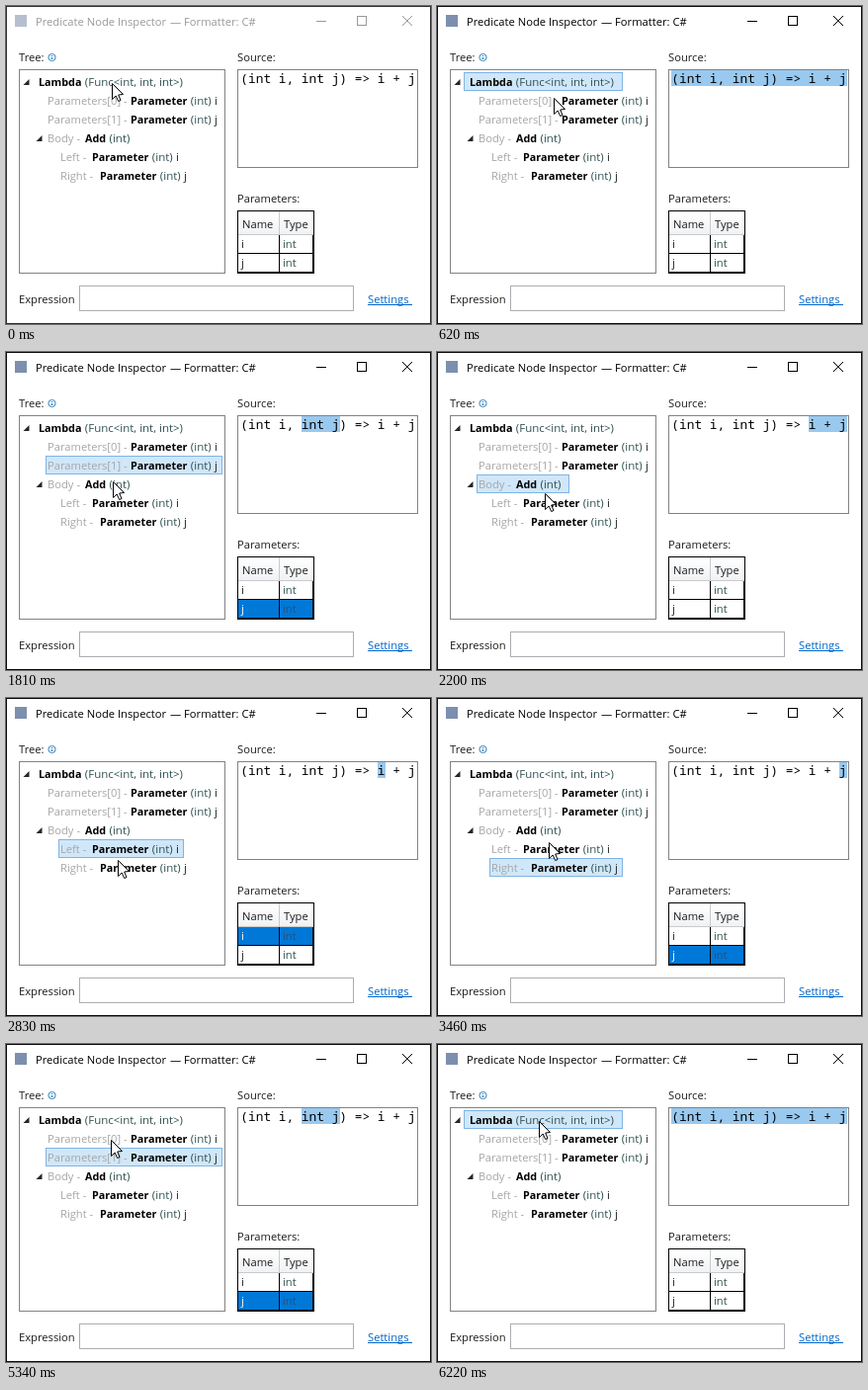
Recreate the animation shown at these times as an HTML page with a canvas. Size 430 by 322 pixels, loop 6.3 s.

```html
<!DOCTYPE html>
<html lang="en">
<head>
<meta charset="utf-8">
<title>Predicate Node Inspector</title>
<style>
  html, body { margin: 0; width: 100%; height: 100%; overflow: hidden; background: #fff; }
  canvas { display: block; }
</style>
</head>
<body>
<canvas id="stage" width="430" height="322"></canvas>
<script>
const ctx = document.getElementById('stage').getContext('2d');
const LOOP = 6300, FOCUS = 150, HOLD = 155, STEP = 80;
const ROW = 19, SPACE = 3.4, CHAR = 7.7;
const SANS = '"Open Sans", "Noto Sans", sans-serif';
const REGULAR = '11.2px ' + SANS;
const TYPE = '11.5px ' + SANS;
const BOLD = 'bold 10.8px ' + SANS;
const MONO = '12.83px "Noto Sans Mono", monospace';
const GRAY = '#a6a6a6', SLATE = '#2f4f4f', INK = '#1c1c1c';
const CODE = '(int i, int j) => i + j';

// x is where the bold kind starts; span is the part of the code it selects.
const nodes = [
  { depth: 0, x: 33, label: '', kind: 'Lambda', type: '(Func<int, int, int>)', name: '', span: CODE },
  { depth: 1, x: 126, label: 'Parameters[0] -', kind: 'Parameter', type: '(int)', name: 'i', span: 'int i' },
  { depth: 1, x: 126, label: 'Parameters[1] -', kind: 'Parameter', type: '(int)', name: 'j', span: 'int j' },
  { depth: 1, x: 80, label: 'Body -', kind: 'Add', type: '(int)', name: '', span: 'i + j' },
  { depth: 2, x: 87, label: 'Left -', kind: 'Parameter', type: '(int)', name: 'i', span: 'i' },
  { depth: 2, x: 95, label: 'Right -', kind: 'Parameter', type: '(int)', name: 'j', span: 'j' }
];

// Each visit: click time, node clicked, pointer position, steps taken to get there
const visit = (time, node, x, y, steps = 4) => ({ time, node: nodes[node], x, y, steps });
const visits = [
  visit(310, 0, 107, 78), visit(770, 1, 118, 93, 2), visit(1410, 2, 126, 114, 7),
  visit(1890, 3, 108, 131), visit(2510, 4, 109, 149, 3), visit(2980, 5, 113, 164, 3),
  visit(3620, 4, 113, 146, 5), visit(4240, 3, 103, 131), visit(4780, 2, 106, 115),
  visit(5420, 1, 106, 97), visit(5980, 0, 103, 78)
];

// The pointer rests during a press, then walks evenly to the next node.
function stateAt(t) {
  const next = visits.findIndex(v => v.time > t);
  const last = (next < 0 ? visits.length : next) - 1;
  if (last < 0) return { x: visits[0].x, y: visits[0].y, node: null, pressed: false };
  const from = visits[last], to = visits[last + 1] || from;
  const since = t - from.time - HOLD;
  const walked = since < 0 ? 0 : Math.min(1, (Math.floor(since / STEP) + 1) / to.steps);
  return {
    x: Math.round(from.x + (to.x - from.x) * walked),
    y: Math.round(from.y + (to.y - from.y) * walked),
    node: from.node,
    pressed: since < 0
  };
}

function fill(x, y, w, h, color) {
  ctx.fillStyle = color;
  ctx.fillRect(x, y, w, h);
}

function frame(x, y, w, h, color) {
  ctx.strokeStyle = color;
  ctx.lineWidth = 1;
  ctx.strokeRect(x + 0.5, y + 0.5, w - 1, h - 1);
}

// Returns the x where the text ends.
function text(str, x, y, color = INK, font = REGULAR) {
  ctx.font = font;
  ctx.fillStyle = color;
  ctx.fillText(str, x, y);
  return x + ctx.measureText(str).width;
}

function widthOf(str, font) {
  ctx.font = font;
  return ctx.measureText(str).width;
}

function path(points, closed) {
  ctx.beginPath();
  points.forEach(([x, y]) => ctx.lineTo(x, y));
  if (closed) ctx.closePath();
}

function disc(x, y, r) {
  ctx.beginPath();
  ctx.arc(x, y, r, 0, Math.PI * 2);
}

function drawTitleBar(active) {
  const color = active ? '#000' : '#999';
  frame(0, 0, 430, 322, active ? '#111' : '#333');
  fill(9, 9, 12, 12, active ? '#7d8fae' : '#b5bfd0');
  text('Predicate Node Inspector', 30, 20, color);
  text('— Formatter: C#', 166, 20, color);

  fill(314, 15, 10, 1, color);
  frame(355, 10, 10, 10, color);
  for (const side of [-1, 1]) {
    path([[406 - 5 * side, 10], [406 + 5 * side, 20]]);
    ctx.stroke();
  }
}

function drawLabels() {
  text('Tree:', 13, 56);
  ctx.strokeStyle = '#3085bd';
  disc(46.5, 52, 3.6);
  ctx.stroke();
  fill(46, 50, 1, 1, '#1670ad');
  fill(46, 52, 1, 2, '#1670ad');

  text('Source:', 234, 56);
  text('Parameters:', 234, 199);
  text('Expression', 13, 301);
  frame(74, 283, 278, 26, '#abadb3');
  text('Settings', 366, 301, '#0066cc');
  fill(366, 302, 45, 1, '#0066cc');
}

function drawHighlight(node, y) {
  const left = 27 + 13 * node.depth;
  const right = node.x + widthOf(node.kind, BOLD) + widthOf(node.type, TYPE)
    + widthOf(node.name, REGULAR) + 2 * SPACE + 5.5;
  const width = Math.round(right) - left;
  fill(left, y, width, ROW, '#d0e7fa');
  frame(left, y, width, ROW, '#7fb4e2');
}

function drawNode(node, y) {
  text(node.label, 29 + 13 * node.depth, y, GRAY);
  let x = text(node.kind, node.x, y, '#000', BOLD);
  x = text(node.type, x + SPACE, y, SLATE, TYPE);
  text(node.name, x + SPACE, y);
}

function drawExpander(x, y) {
  path([[x, y], [x, y + 6], [x - 6, y + 6]], true);
  ctx.fillStyle = '#262626';
  ctx.fill();
}

function drawTree({ node: selected, pressed, x, y }) {
  frame(13, 64, 209, 207, '#828282');
  if (selected) drawHighlight(selected, 67 + nodes.indexOf(selected) * ROW);
  if (pressed) {
    disc(x, y, 12);
    ctx.fillStyle = 'rgba(255, 235, 60, 0.75)';
    ctx.fill();
  }
  drawExpander(23.5, 74);
  drawExpander(36.5, 74 + 3 * ROW);
  nodes.forEach((node, i) => drawNode(node, 81 + i * ROW));
}

function drawSource(selected) {
  frame(234, 64, 183, 100, '#828282');
  if (selected) {
    const start = CODE.lastIndexOf(selected.span);
    const x = Math.round(237.4 + start * CHAR);
    const end = Math.round(237.4 + (start + selected.span.length) * CHAR);
    fill(x, 65, end - x, 16, '#99c9ef');
  }
  text(CODE, 237.3, 78, '#000', MONO);
}

function drawTable(selected) {
  const header = ctx.createLinearGradient(0, 208, 0, 232);
  header.addColorStop(0, '#fff');
  header.addColorStop(1, '#eff1f4');
  fill(235, 208, 76, 24, header);
  fill(276, 208, 1, 23, '#c9caca');
  fill(235, 231, 76, 1, '#c9caca');
  text('Name', 239, 225);
  text('Type', 281, 225);

  ['i', 'j'].forEach((name, i) => {
    const y = 232 + i * ROW;
    const active = selected && selected.name === name;
    if (active) fill(235, y, 76, 18, '#0078d7');
    text(name, 238, y + 13, active ? '#fff' : INK);
    text('int', 280, y + 13, active ? '#294f79' : SLATE);
    fill(235, y + 18, 76, 1, '#000');
  });
  fill(276, 232, 1, 38, '#000');
  fill(310, 232, 1, 38, '#000');
  frame(234, 207, 78, 64, '#000');
}

function drawPointer({ x, y }) {
  ctx.save();
  ctx.translate(x + 0.5, y + 0.5);
  path([[0, 0], [0, 16], [3.7, 12.5], [6.2, 18], [8.5, 17], [6.2, 11.5], [11, 11]], true);
  ctx.fillStyle = '#fff';
  ctx.fill();
  ctx.strokeStyle = '#000';
  ctx.lineWidth = 1;
  ctx.stroke();
  ctx.restore();
}

function draw(t) {
  const state = stateAt(t);
  fill(0, 0, 430, 322, '#fff');
  drawTitleBar(t >= FOCUS);
  drawLabels();
  drawTree(state);
  drawSource(state.node);
  drawTable(state.node);
  drawPointer(state);
}

const begin = performance.now();
function tick() {
  draw((performance.now() - begin) % LOOP);
  requestAnimationFrame(tick);
}
tick();
</script>
</body>
</html>
```
